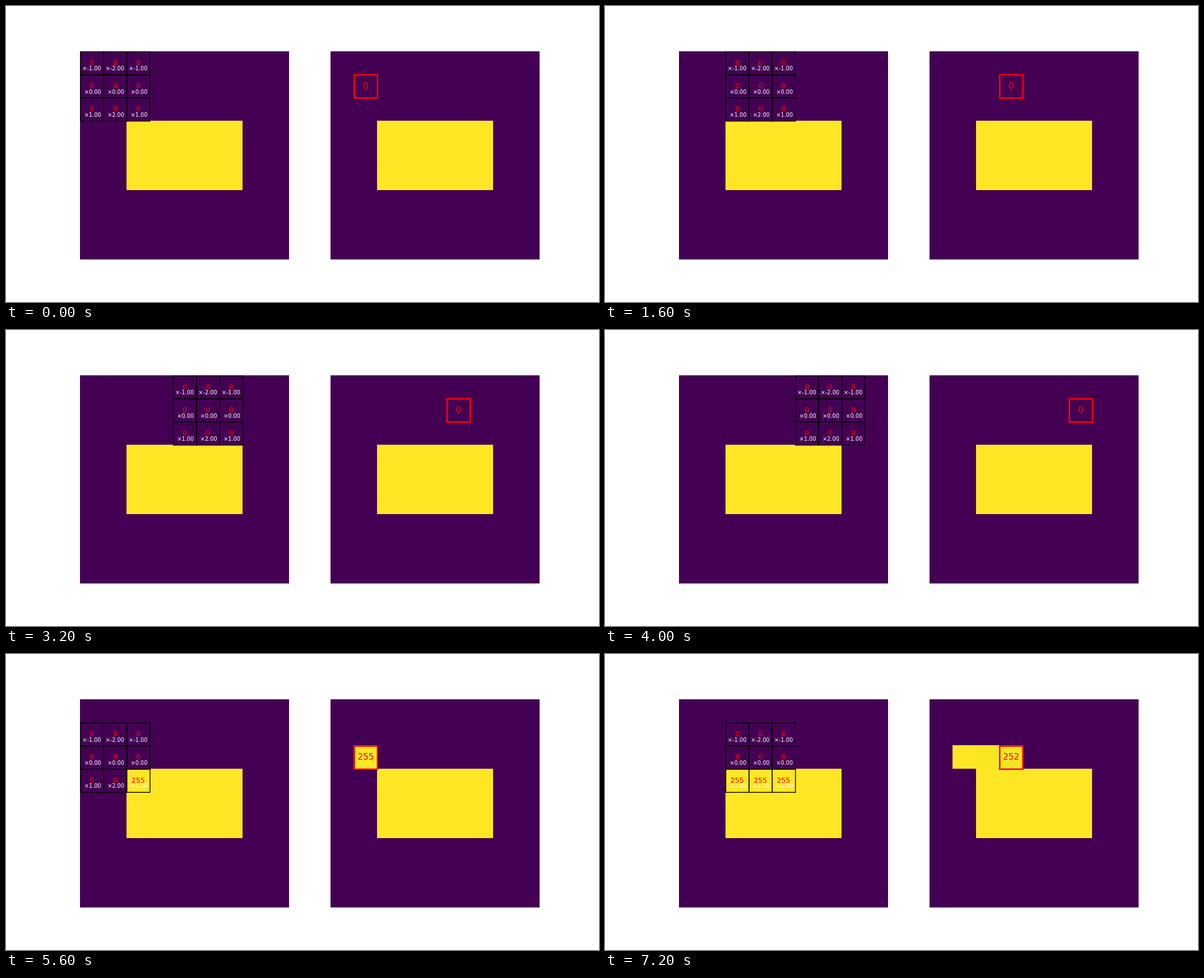
Write an HTML page that moves like this. It is 1058 px wide and 529 px high and loops after 8 s.

```html
<!DOCTYPE html>
<html lang="en">
<head>
<meta charset="utf-8">
<style>
  html, body { margin: 0; width: 100%; height: 100%; overflow: hidden; background: #fff; }
  svg { display: block; width: 100vw; height: 100vh; }
  text { font-family: "DejaVu Sans", sans-serif; }
  .value { font-size: 12.5px; fill: #f00; text-anchor: middle; }
  .weight { font-size: 9.72px; fill: #fff; text-anchor: end; }
  .result { font-size: 15.28px; fill: #f00; text-anchor: middle; }
  .cell { fill: none; stroke: #000; stroke-width: 1.39; }
  .mark { fill: none; stroke: #f00; stroke-width: 2.6; }
</style>
</head>
<body>
<svg id="stage" viewBox="0 0 1058 529">
  <clipPath id="panel"><rect x="132" y="81" width="373" height="372"/></clipPath>
</svg>
<script>
const NS = 'http://www.w3.org/2000/svg';
const STEP = 800, STEPS = 10, COLS = 7;
const CELL = 41.41, LEFT = 132.25, RIGHT = 579.48, TOP = 80.8;
const DX = 0.5, DY = 0.85; // outline offset from the cell grid
const KERNEL = [[-1, -2, -1], [0, 0, 0], [1, 2, 1]];
const COLORS = { 0: '#440154', 252: '#f6e620', 253: '#f8e621', 255: '#fde725' };
const stage = document.getElementById('stage');

function add(parent, tag, attrs, text) {
  const el = document.createElementNS(NS, tag);
  for (const key in attrs) el.setAttribute(key, attrs[key]);
  if (text !== undefined) el.textContent = text;
  return parent.appendChild(el);
}

function block(parent, x0, y0, x1, y1, fill) {
  add(parent, 'rect', { x: x0, y: y0, width: x1 - x0, height: y1 - y0, fill, 'shape-rendering': 'crispEdges' });
}

function outline(parent, x, y, cls) {
  add(parent, 'rect', { class: cls, x: x + DX, y: y + DY, width: CELL, height: CELL });
}

const pixel = (r, c) => (r >= 3 && r <= 5 && c >= 2 && c <= 6 ? 255 : 0);

// Kernel sum, wrapped to one unsigned byte
function convolve(row, col) {
  let sum = 0;
  KERNEL.forEach((line, r) => line.forEach((w, c) => { sum += w * pixel(row + r, col + c); }));
  return ((sum % 256) + 256) % 256;
}

function drawPanel(x) {
  block(stage, x, 81, x + 373, 453, COLORS[0]);
  block(stage, x + 83, 205, x + 290, 329, COLORS[255]);
}

function drawKernel(g, row, col) {
  const cells = add(g, 'g', { 'clip-path': 'url(#panel)' });
  KERNEL.forEach((line, r) => line.forEach((w, c) => {
    const x = LEFT + (col + c) * CELL, y = TOP + (row + r) * CELL;
    const value = pixel(row + r, col + c);
    outline(cells, x, y, 'cell');
    add(g, 'text', { class: 'weight', x: x + 37.3, y: y + 34.3 }, '×' + w.toFixed(2));
    add(g, 'text', { class: 'value', x: x + (value ? 20.6 : 21.2), y: y + 24.7 }, value);
  }));
}

function drawResult(g, row, col) {
  for (let c = 0; row === 1 && c <= col; c++) {
    const edge = k => Math.round(579 + k * CELL);
    block(g, edge(c + 1), 163, edge(c + 2), 205, COLORS[convolve(row, c)]);
  }
  const x = RIGHT + (col + 1) * CELL, y = TOP + (row + 1) * CELL;
  outline(g, x, y, 'mark');
  add(g, 'text', { class: 'result', x: x + 20.9, y: y + 25.7 }, convolve(row, col));
}

drawPanel(132);
drawPanel(579);
const scenes = Array.from({ length: STEPS }, (_, i) => {
  const g = add(stage, 'g', { visibility: 'hidden' });
  const row = Math.floor(i / COLS), col = i % COLS;
  drawKernel(g, row, col);
  drawResult(g, row, col);
  return g;
});

let shown = -1;
const start = performance.now();
function tick(now) {
  const i = Math.floor(Math.max(0, now - start) / STEP) % STEPS;
  if (i !== shown) {
    scenes.forEach((g, k) => g.setAttribute('visibility', k === i ? 'visible' : 'hidden'));
    shown = i;
  }
  requestAnimationFrame(tick);
}
tick(start);
</script>
</body>
</html>
```
